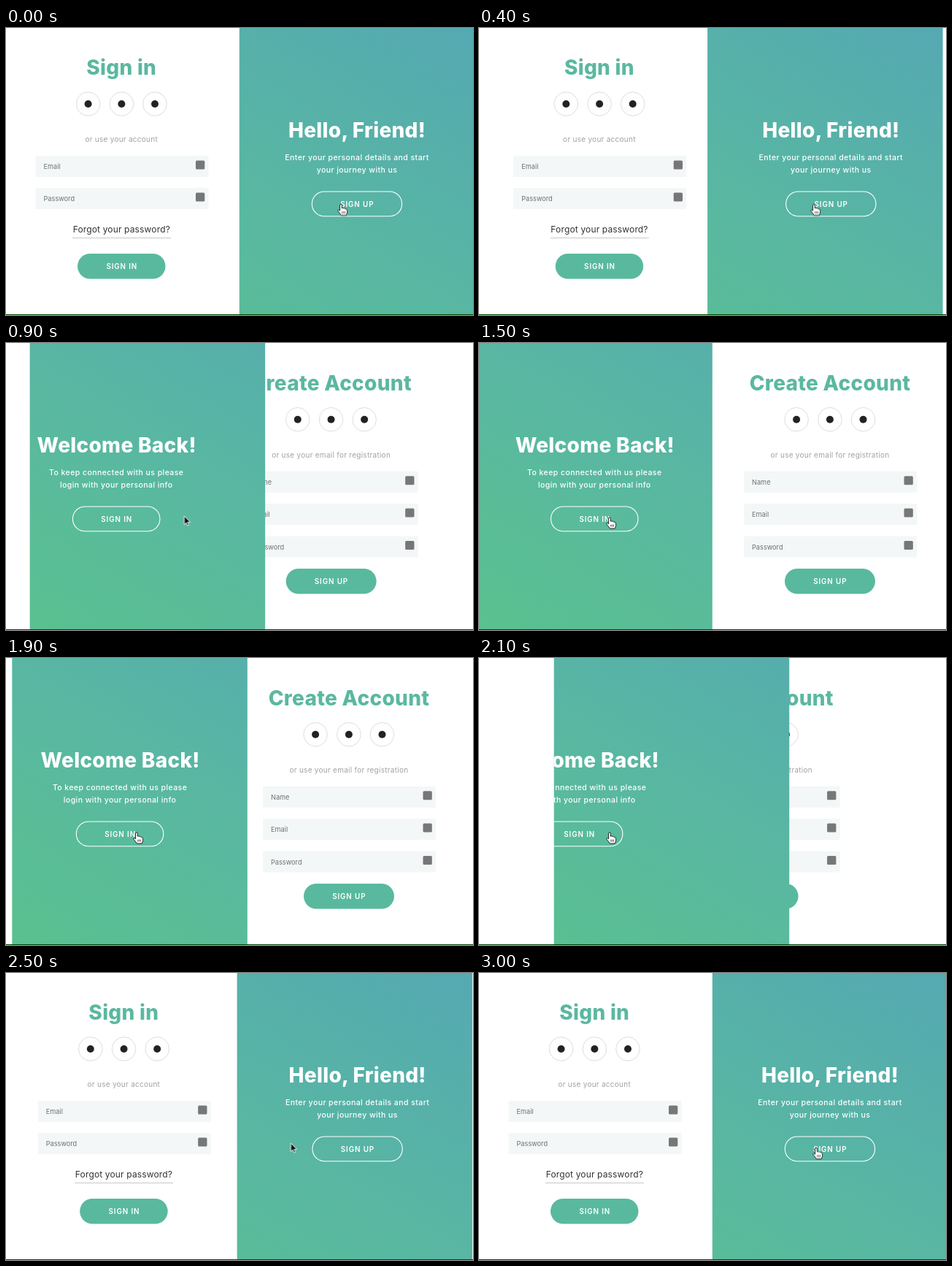
Recreate the animation shown at these times as an HTML page. Size 640x393 px, loop 3100 ms.

```html
<!DOCTYPE html>
<html lang="en">
<head>
<meta charset="utf-8">
<title>Sliding sign in form</title>
<style>
  @property --p { syntax: '<number>'; inherits: true; initial-value: 0; }

  html, body { margin: 0; width: 100%; height: 100%; overflow: hidden; background: #fff; }

  /* --p: 0 = sign in, 1 = sign up */
  svg {
    display: block; width: 640px; height: 393px;
    --shift: calc(var(--p) * 322.5px);
    animation: slide 3.1s infinite;
    font-family: Inter, sans-serif;
  }
  @keyframes slide {
    0%, 10.45% { --p: 0; animation-timing-function: ease-in-out; }
    34.65%, 58.15% { --p: 1; animation-timing-function: ease-in-out; }
    82.4%, 100% { --p: 0; }
  }

  .form { transform: translateX(var(--shift)); }
  .in { opacity: calc((.5 - var(--p)) * 100000); }
  .up { opacity: calc((var(--p) - .5) * 100000); }

  .overlay { transform: translateX(calc(var(--p) * -322.5px)); }
  .still { transform: translateX(var(--shift)); }
  .hello { transform: translateX(calc(var(--p) * 64.5px)); }
  .welcome { transform: translateX(calc((var(--p) - 1) * 64.5px)); }

  text { text-anchor: middle; }
  .title { font-size: 28px; font-weight: 800; letter-spacing: .3px; }
  .form .title { fill: #5bb8a0; }
  .overlay text { fill: #fff; }
  .note { font-size: 10px; letter-spacing: .27px; fill: #a2a2a2; }
  .para { font-size: 10.5px; font-weight: 500; letter-spacing: .43px; }
  .label { font-size: 9.2px; fill: #6f7272; text-anchor: start; }
  .link { font-size: 12px; letter-spacing: .15px; fill: #333; }
  .btn { font-size: 9.8px; font-weight: 600; letter-spacing: .9px; fill: #fff; }
  .solid { fill: #59b99e; }
  .ghost { fill: none; stroke: #fff; stroke-width: 1.1; }

  .cursor { animation: move 3.1s infinite; stroke-linejoin: round; }
  @keyframes move {
    0%, 16.1% { transform: translate(459px, 241.5px); animation-timing-function: ease-in; }
    29% { transform: translate(245px, 237px); animation-timing-function: ease-out; }
    39%, 68.5% { transform: translate(179px, 239px); animation-timing-function: ease-in; }
    80.65% { transform: translate(390px, 233px); animation-timing-function: ease-out; }
    91%, 97% { transform: translate(462px, 239.5px); }
    100% { transform: translate(459px, 241.5px); }
  }
  .arrow { animation: arrow 3.1s step-end infinite; }
  .hand { animation: hand 3.1s step-end infinite; }
  @keyframes arrow {
    0%, 33.9%, 84.5% { opacity: 0; }
    18.7%, 70.5% { opacity: 1; }
  }
  @keyframes hand {
    0%, 33.9%, 84.5% { opacity: 1; }
    18.7%, 70.5% { opacity: 0; }
  }
</style>
</head>
<body>
<svg viewBox="0 0 640 393">
  <defs>
    <!-- runs corner to corner, bands parallel to the other diagonal -->
    <linearGradient id="sea" x1="0" y1="1" x2="1" y2="0">
      <stop offset="0" stop-color="#5ac18e"/>
      <stop offset=".4" stop-color="#59b99f"/>
      <stop offset="1" stop-color="#55a9b2"/>
    </linearGradient>
    <clipPath id="panel"><rect x="319.8" width="322.5" height="393"/></clipPath>
    <g id="field">
      <rect x="40.5" width="237" height="29" fill="#f4f7f7"/>
      <rect x="260" y="6.5" width="12.3" height="12" rx="1.5" fill="#777"/>
    </g>
    <g id="social">
      <circle r="16.3" fill="#fff" stroke="#ddd"/>
      <circle r="5" fill="#222"/>
    </g>
    <g id="socials">
      <use href="#social" x="112.6"/>
      <use href="#social" x="158.4"/>
      <use href="#social" x="204"/>
    </g>
  </defs>

  <rect width="640" height="393" fill="#fff"/>

  <g class="form">
    <g class="in">
      <text class="title" x="158.2" y="64">Sign in</text>
      <use href="#socials" y="104"/>
      <text class="note" x="158.2" y="156">or use your account</text>
      <use href="#field" y="175"/>
      <text class="label" x="51.5" y="192.5">Email</text>
      <use href="#field" y="219"/>
      <text class="label" x="51.5" y="237">Password</text>
      <text class="link" x="158.3" y="280">Forgot your password?</text>
      <rect x="91" y="287" width="135" height="1" fill="#c8c8c8"/>
      <rect class="solid" x="98" y="309" width="120.5" height="34.5" rx="17.25"/>
      <text class="btn" x="158.8" y="330">SIGN IN</text>
    </g>
    <g class="up">
      <text class="title" x="158.5" y="65">Create Account</text>
      <use href="#socials" y="104.7"/>
      <text class="note" x="158.5" y="157">or use your email for registration</text>
      <use href="#field" y="175.7"/>
      <text class="label" x="51.5" y="193.5">Name</text>
      <use href="#field" y="220"/>
      <text class="label" x="51.5" y="238">Email</text>
      <use href="#field" y="264.5"/>
      <text class="label" x="51.5" y="282.5">Password</text>
      <rect class="solid" x="96.5" y="309" width="124" height="34.5" rx="17.25"/>
      <text class="btn" x="158.8" y="330">SIGN UP</text>
    </g>
  </g>

  <g class="overlay">
    <g clip-path="url(#panel)">
      <g class="still">
        <rect x="-2.7" width="645" height="393" fill="url(#sea)"/>
        <g class="welcome">
          <text class="title" x="158.8" y="150">Welcome Back!</text>
          <text class="para" x="158.3" y="181">To keep connected with us please</text>
          <text class="para" x="158.3" y="198">login with your personal info</text>
          <rect class="ghost" x="98.5" y="224" width="119.5" height="33.7" rx="16.8"/>
          <text class="btn" x="158.8" y="244.5">SIGN IN</text>
        </g>
        <g class="hello">
          <text class="title" x="481" y="150">Hello, Friend!</text>
          <text class="para" x="481" y="181">Enter your personal details and start</text>
          <text class="para" x="481" y="198">your journey with us</text>
          <rect class="ghost" x="419.3" y="224" width="123.3" height="33.7" rx="16.8"/>
          <text class="btn" x="481.3" y="244.5">SIGN UP</text>
        </g>
      </g>
    </g>
  </g>

  <rect y="392" width="640" height="1" fill="#004a00"/>

  <g class="cursor">
    <path class="arrow" d="M0 0V11.5L2.7 9L4.4 13L6.3 12.2L4.6 8.3H8.2Z" fill="#111" stroke="#fff" stroke-width=".9"/>
    <g class="hand" stroke="#111" stroke-width=".9">
      <path fill="#fff" d="M-1.4 1.2Q-1.4 -.2 0 -.2Q1.3 -.2 1.3 1.2V5.2Q2.3 4.2 3.4 5.4Q4.7 4.6 5.6 6Q7 5.4 7.6 7Q8.6 6.8 8.6 8.4V10.6Q8.4 13 7.2 15H.4Q-1.4 12.2 -4 9.2Q-4.6 7.8 -3.4 7.5Q-2.4 7.3 -1.4 8.8Z"/>
      <path fill="none" stroke-width=".7" d="M1.7 9.6v3M3.6 9.6v3M5.5 9.6v3"/>
    </g>
  </g>
</svg>
</body>
</html>
```
